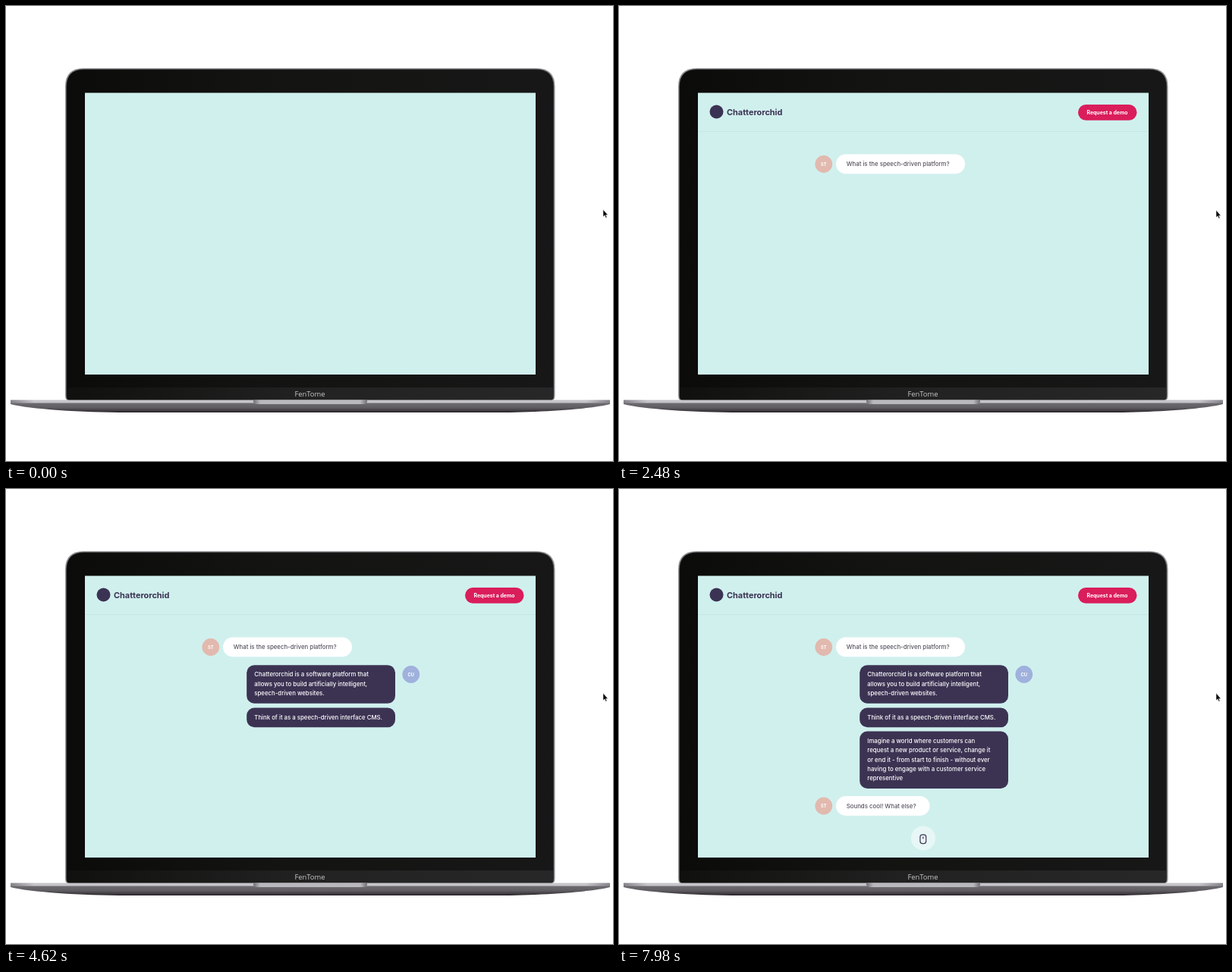
Recreate the animation shown at these times as an HTML page. Size 800x600 px, loop 8 s.

```html
<!DOCTYPE html>
<html lang="en">
<head>
<meta charset="utf-8">
<title>Chat on a laptop</title>
<style>
  html, body { margin: 0; width: 100%; height: 100%; overflow: hidden; background: #fff; }
  svg { display: block; width: 800px; height: 600px; }
  text { font-family: Inter, sans-serif; font-size: 7.82px; font-weight: 550; }
  .brand { font-size: 10.9px; font-weight: 700; fill: #3b3353; }
  .button { font-size: 6.93px; font-weight: 700; fill: #fff; text-anchor: middle; }
  .initials { font-size: 5.8px; font-weight: 700; fill: #fff; text-anchor: middle; }
  .model { font-family: "Open Sans", sans-serif; font-size: 9.4px; font-weight: 400; fill: #cbcbcb; text-anchor: middle; }
</style>
</head>
<body>
<svg viewBox="0 0 800 600">
  <defs>
    <linearGradient id="glass">
      <stop offset="0" stop-color="#0b0b09"/>
      <stop offset=".4" stop-color="#131311"/>
      <stop offset="1" stop-color="#171717"/>
    </linearGradient>
    <linearGradient id="chin">
      <stop offset="0" stop-color="#10100e"/>
      <stop offset=".5" stop-color="#222"/>
      <stop offset="1" stop-color="#272728"/>
    </linearGradient>
    <linearGradient id="base" x2="0" y2="1">
      <stop offset="0" stop-color="#77747a"/>
      <stop offset=".6" stop-color="#5f5c62"/>
      <stop offset=".85" stop-color="#3f3b40"/>
      <stop offset="1" stop-color="#262226"/>
    </linearGradient>
    <linearGradient id="edge">
      <stop offset="0" stop-color="#85838a"/>
      <stop offset=".04" stop-color="#c6c5ca"/>
      <stop offset=".96" stop-color="#c6c5ca"/>
      <stop offset="1" stop-color="#85838a"/>
    </linearGradient>
    <linearGradient id="notch">
      <stop offset="0" stop-color="#706e74"/>
      <stop offset=".06" stop-color="#b9b8bd"/>
      <stop offset=".94" stop-color="#b9b8bd"/>
      <stop offset="1" stop-color="#706e74"/>
    </linearGradient>
    <clipPath id="screen"><rect x="104" y="114.5" width="594" height="371.5"/></clipPath>
  </defs>

  <!-- laptop -->
  <path d="M78 514V106Q78 82 102 82H699Q723.5 82 723.5 106V514Q723.5 520.5 718 520.5H83Q78 520.5 78 514Z" fill="#98979c"/>
  <path d="M79.6 514V106.5Q79.6 83.6 102.5 83.6H699Q721.9 83.6 721.9 106.5V514Q721.9 520 717 520H84Q79.6 520 79.6 514Z"
        fill="url(#glass)" stroke="#4a494c" stroke-width=".6"/>
  <path d="M80.5 503H721V514Q721 520 716 520H85Q80.5 520 80.5 514Z" fill="url(#chin)"/>
  <text class="model" x="400.5" y="515">FenTome</text>
  <path d="M6 520H796V525C772 531.5 700 536 640 536H160C100 536 30 531.5 6 525Z" fill="url(#base)"/>
  <rect x="6" y="519.5" width="790" height="4" fill="url(#edge)"/>
  <path d="M326 519.5H476V521Q476 525 471 525H331Q326 525 326 521Z" fill="url(#notch)"/>
  <rect x="104" y="114.5" width="594" height="371.5" fill="#d0f0ee"/>

  <g clip-path="url(#screen)">
    <g id="header">
      <path d="M104 165.5H698" stroke="#c5e6e4" stroke-width=".8"/>
      <circle cx="128.5" cy="139.5" r="9" fill="#3b3353"/>
      <text class="brand" x="142" y="143.8">Chatterorchid</text>
      <rect x="605" y="130" width="77.5" height="20.8" rx="10.4" fill="#da1d5b"/>
      <text class="button" x="643.5" y="142.7">Request a demo</text>
    </g>
    <g id="chat"></g>
    <g id="hint">
      <circle cx="401" cy="460.5" r="16" fill="#fff" fill-opacity=".5"/>
      <g id="mouse" fill="none" stroke="#3b3353" stroke-width="1.2" stroke-linecap="round">
        <rect x="396.9" y="-5.9" width="7.8" height="11.8" rx="3"/>
        <path d="M400.8 -2.8V-1"/>
      </g>
    </g>
  </g>

  <path id="cursor" d="M787 268.5V278L789.1 276.1L790.6 279.4L792 278.8L790.6 275.6H793.3Z"
        fill="#000" stroke="#fff" stroke-width=".5"/>
</svg>
<script>
const LOOP = 8000, LINE = 12.4;
const byId = id => document.getElementById(id);

const avatar = (x, y, initials, color) =>
  `<circle cx="${x}" cy="${y}" r="11.4" fill="${color}"/>
   <text class="initials" x="${x}" y="${y + 2.1}">${initials}</text>`;

const bubble = (x, y, w, h, r, fill) =>
  `<rect x="${x}" y="${y}" width="${w}" height="${h}" rx="${r}" fill="${fill}"/>`;

const question = (start, y, width, line) => ({
  start, originX: 286, originY: y + 13,
  markup: avatar(269.8, y + 13, "ST", "#e2b9ae") + bubble(286, y, width, 25.8, 12.9, "#fff") +
    `<text x="299.7" y="${y + 15.6}" fill="#56515f">${line}</text>`
});

const answer = (start, y, lines, extra = "") => {
  const height = 25.8 + (lines.length - 1) * LINE;
  const rows = lines.map((line, i) =>
    `<text x="327.3" y="${y + 15.2 + i * LINE}" fill="#fff">${line}</text>`).join("");
  return {
    start, originX: 513, originY: y + height / 2,
    markup: bubble(317.2, y, 195.8, height, 10, "#3c3353") + rows + extra
  };
};

const messages = [
  question(1850, 195.5, 170, "What is the speech-driven platform?"),
  answer(3100, 232.2, [
    "Chatterorchid is a software platform that",
    "allows you to build artificially intelligent,",
    "speech-driven websites."
  ], avatar(533.8, 244.5, "CU", "#9fb1dc")),
  answer(4200, 288.5, ["Think of it as a speech-driven interface CMS."]),
  answer(4720, 319.5, [
    "Imagine a world where customers can",
    "request a new product or service, change it",
    "or end it - from start to finish - without ever",
    "having to engage with a customer service",
    "representive"
  ]),
  question(5750, 405, 123.5, "Sounds cool! What else?")
];

for (const message of messages) {
  message.node = document.createElementNS("http://www.w3.org/2000/svg", "g");
  message.node.innerHTML = message.markup;
  byId("chat").append(message.node);
}

const easeOut = (t, start, duration) => {
  const p = Math.min(1, Math.max(0, (t - start) / duration));
  return 1 - (1 - p) ** 3;
};

function place(node, opacity, transform) {
  node.setAttribute("opacity", opacity);
  node.setAttribute("transform", transform);
}

function draw(t) {
  const shown = easeOut(t, 780, 800);
  place(byId("header"), shown, `translate(0 ${-24 * (1 - shown)})`);

  for (const { node, start, originX, originY } of messages) {
    const p = easeOut(t, start, 450);
    const scale = 0.92 + 0.08 * p;
    place(node, p, `translate(${originX} ${originY + 11 * (1 - p)}) scale(${scale}) translate(${-originX} ${-originY})`);
  }

  const hint = easeOut(t, 6300, 450);
  place(byId("hint"), hint, `translate(0 ${11 * (1 - hint)})`);
  const bob = 459 - 3 * Math.cos((t - 6840) / 2000 * 2 * Math.PI);
  place(byId("mouse"), 1, `translate(0 ${bob})`);

  place(byId("cursor"), 1, `translate(0 ${t < 400 ? 0 : 0.8})`);
}

function frame() {
  draw(performance.now() % LOOP);
  requestAnimationFrame(frame);
}
frame();
</script>
</body>
</html>
```
